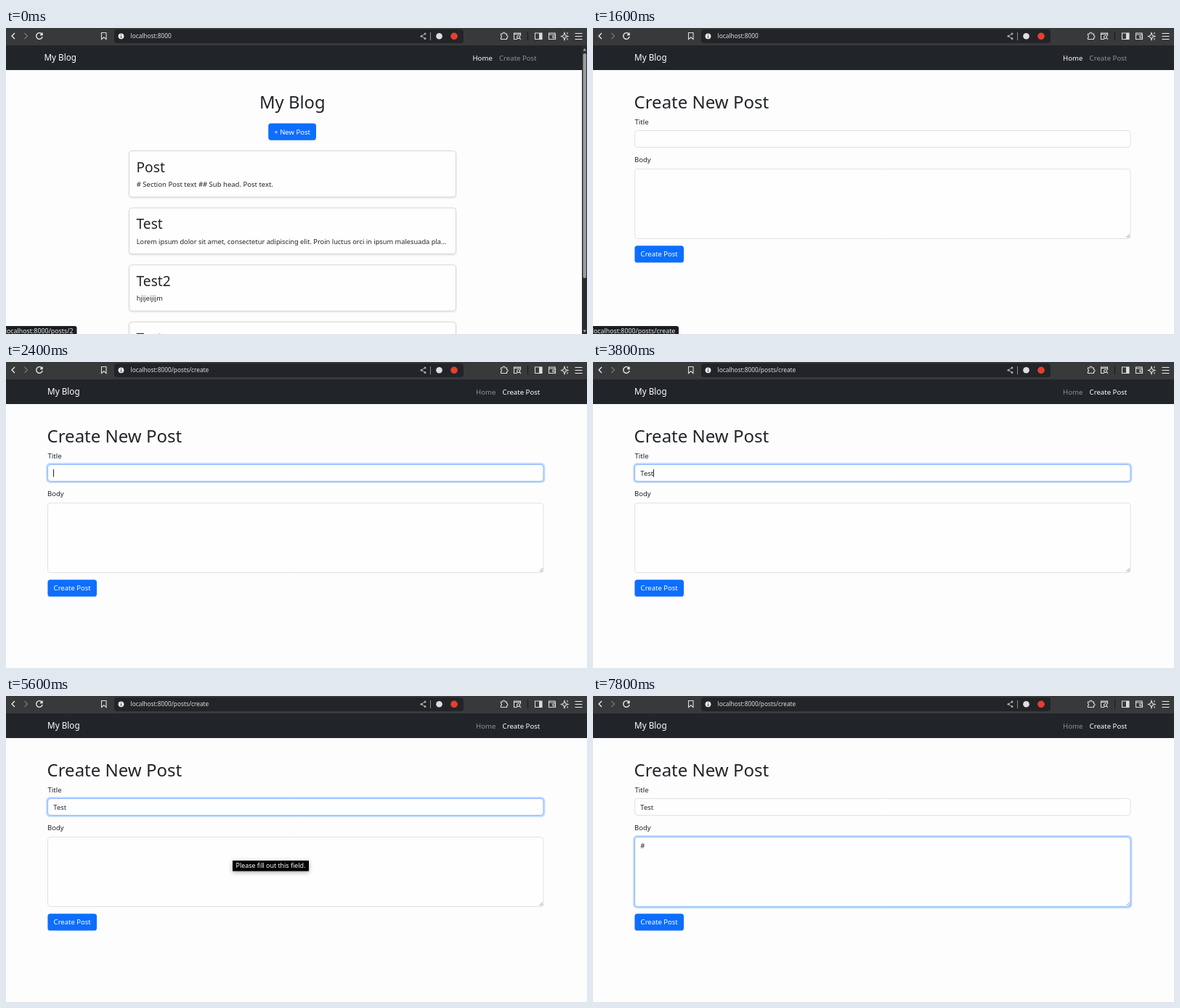
Animation, 800 px wide and 422 px high, one loop 8000 ms. Source, as an HTML page with a canvas:

```html
<!DOCTYPE html>
<html lang="en">
<head>
<meta charset="utf-8">
<title>Blog</title>
<style>
  html, body { margin: 0; width: 100%; height: 100%; overflow: hidden; background: #fefdfe; }
  canvas { display: block; }
</style>
</head>
<body>
<canvas id="stage" width="800" height="422"></canvas>
<script>
const ctx = document.getElementById('stage').getContext('2d');
const LOOP = 8000;
const INK = '#212529', BLUE = '#0d6efd', ICON = '#dcdcde';

// Latest value in a list of [start time, value] steps.
const at = (steps, t) => steps.filter(([start]) => t >= start).pop()[1];

const STATUS = [[0, '2'], [400, '3'], [600, '4'], [1000, 'create'], [2200, '']];
const TITLE = [[0, ''], [3000, 'T'], [3400, 'Te'], [3600, 'Tes'], [3800, 'Test']];
const BODY = [[0, ''], [7200, '#']];
const FOCUS = [[0, ''], [2400, 'title'], [6000, 'body']];
const CARET = [[0, false], [2400, true], [2800, false], [3000, true], [4400, false], [5000, true],
  [5600, false], [6000, true], [6400, false], [7000, true], [7800, false]];

const CARDS = [
  ['Post', '# Section Post text ## Sub head. Post text.', 9.5],
  ['Test', 'Lorem ipsum dolor sit amet, consectetur adipiscing elit. Proin luctus orci in ipsum malesuada pla…', 9.28],
  ['Test2', 'hjijeijijm', 9.2],
  ['Test', '', 9.5]
];

function text(str, x, y, size = 9.5, color = INK, align = 'left') {
  ctx.font = `${size}px "Noto Sans", "Open Sans", sans-serif`;
  ctx.textAlign = align;
  ctx.fillStyle = color;
  ctx.fillText(str, x, y);
}

function rect(x, y, w, h, fill, radius = 0, stroke) {
  ctx.beginPath();
  ctx.roundRect(x, y, w, h, radius);
  if (fill) { ctx.fillStyle = fill; ctx.fill(); }
  if (stroke) { ctx.strokeStyle = stroke; ctx.stroke(); }
}

function dot(x, y, r, fill) {
  ctx.beginPath();
  ctx.arc(x, y, r, 0, Math.PI * 2);
  ctx.fillStyle = fill;
  ctx.fill();
}

function line(path, color = ICON, width = 1.1) {
  ctx.lineWidth = width;
  ctx.strokeStyle = color;
  ctx.stroke(new Path2D(path));
  ctx.lineWidth = 1;
}

function browserBar(url) {
  rect(0, 0, 800, 24, '#38393b');
  rect(149, 2, 481, 19, '#232427', 4);
  line('M12 7L8 11L12 15', '#f0f0f0', 1.3);
  line('M25.500 7L29.500 11L25.500 15', '#77787a', 1.2);
  line('M49.500 8.500A4.300 4.300 0 1 0 50.200 12M50 6.500V9.500H47', '#f0f0f0', 1.3);
  line('M131.500 6.500H138V15.500L134.750 12.800L131.500 15.500Z');
  dot(158.500, 11.300, 3.900, '#f0f0f0');
  rect(158, 10.700, 1, 3, '#232427');
  rect(158, 8.700, 1, 1, '#232427');
  text(url, 171.500, 14.200, 8.3, '#dddddf');

  line('M577 8L572 11.200L577 14.500', '#a9aaac', 1);
  [[577, 8], [572, 11.2], [577, 14.5]].forEach(([x, y]) => dot(x, y, 1.5, '#a9aaac'));
  rect(584, 6, 1, 11, '#898a8c');
  dot(596.500, 11.300, 4.300, '#dedee2');
  dot(617, 11.300, 4.800, '#e5402f');

  line('M681.500 8H684V7.500A1.500 1.500 0 0 1 687 7.500V8H689.500V10.500A1.500 1.500 0 0 1 689.500 13.500V15.500H681.500V13A1.400 1.400 0 0 0 681.500 10.300Z');
  line('M704 15.500H699.500V7H708.500V11M699.500 8.500H708.500M707.500 14L709 15.800');
  line('M707.500 12.500A2 2 0 1 0 703.500 12.500A2 2 0 1 0 707.500 12.500');
  rect(718, 5, 1, 12, '#18191a');
  line('M728.500 7H738V15.500H728.500Z');
  rect(734, 7, 4, 8.500, ICON);
  line('M756 9V7H747.500V15.500H756.500V9H747.500M756.500 11H753V13.500H756.500');
  line('M769 6.500L770.300 10.200L774 11.500L770.300 12.800L769 16.500L767.700 12.800L764.500 11.500L767.700 10.200ZM773 6V8.500M773 14V16.500');
  line('M783.500 7.500H793.500M783.500 11.500H793.500M783.500 15.500H793.500', '#eeeeee', 1.2);
}

function navbar(dx, creating) {
  rect(0, 24, 800, 34, INK);
  text('My Blog', 52.500 + dx, 45, 11.7, '#fff');
  text('Home', 642.500 + dx, 44.500, 9.6, creating ? '#909294' : '#fff');
  text('Create Post', 679 + dx, 44.500, 9.6, creating ? '#fff' : '#909294');
}

function button(label, x, y, w, color = BLUE) {
  rect(x, y, w, 23.400, color, 3.700);
  text(label, x + w / 2, y + 15.200, 9.5, '#fff', 'center');
}

function listPage(hover) {
  text('My Blog', 394.300, 110.500, 23.8, INK, 'center');
  button('+ New Post', 361.200, 131.400, 65.800, hover ? '#0b5ed7' : BLUE);
  CARDS.forEach(([title, body, size], i) => {
    const y = 169.500 + i * 78.600;
    ctx.shadowColor = 'rgba(0,0,0,.13)';
    ctx.shadowBlur = 3;
    ctx.shadowOffsetY = 1.300;
    rect(169.500, y, 450, 63.500, '#fefefe', 3.700);
    ctx.shadowColor = 'transparent';
    rect(169.500, y, 450, 63.500, null, 3.700, '#d5d7da');
    text(title, 179.500, y + 29.300, 19.2);
    text(body, 179.700, y + 49.400, size);
  });

  rect(793, 24, 7, 398, '#2b2c2e');
  rect(794.500, 35, 4.500, 310, '#9b9c9d', 2.200);
  ctx.fillStyle = '#a5a6a7';
  ctx.fill(new Path2D('M794.500 31.500L796.800 28L799 31.500ZM794.500 416.500L796.800 420L799 416.500Z'));
}

function field(y, h, value, focused, caret) {
  if (focused) rect(55.100, y - 2.400, 687.300, h + 4.800, '#c2dbfe', 5.500);
  rect(57.500, y, 682.500, h, '#fefefe', 3.700, focused ? '#86b7fe' : '#dee2e6');
  text(value, 65.300, y + 15.500);
  if (caret) rect(Math.round(65.300 + ctx.measureText(value).width), y + 6.500, 1, 10.500, INK);
}

function formPage(t) {
  const focus = at(FOCUS, t), caret = at(CARET, t);
  text('Create New Post', 56.500, 110.500, 24);
  text('Title', 57.500, 132.500, 9.6);
  field(141.500, 23, at(TITLE, t), focus === 'title', caret && focus === 'title');
  text('Body', 57, 185.300);
  field(194.500, 96, at(BODY, t), focus === 'body', caret && focus === 'body');
  line('M734.500 289L739 284.500M737 289.500L739.300 287.200', '#77797b', 0.8);
  button('Create Post', 57.400, 300.200, 67.600);

  if (t >= 5400 && t < 6000) {
    ctx.shadowColor = 'rgba(0,0,0,.35)';
    ctx.shadowBlur = 6;
    ctx.shadowOffsetY = 1.500;
    rect(312, 227, 105, 14.500, '#000');
    ctx.shadowColor = 'transparent';
    text('Please fill out this field.', 364.500, 237.300, 8.9, '#fff', 'center');
  }
}

function statusBar(t) {
  const page = at(STATUS, t);
  if (!page) return;
  ctx.globalAlpha = t >= 2000 ? 0.5 : 1;
  rect(-4, 411, page === 'create' ? 122 : 101.500, 14, '#1d1e20', 3);
  text('localhost:8000/posts/' + page, -1.300, 420.500, 8.83, '#eeeeef');
  ctx.globalAlpha = 1;
}

function draw(now) {
  const t = now % LOOP;
  const form = t >= 1600, creating = t >= 1800;
  rect(0, 0, 800, 422, '#fefdfe');
  navbar(form ? 4.600 : 0, creating);
  browserBar('localhost:8000' + (creating ? '/posts/create' : ''));
  if (form) formPage(t);
  else listPage(t >= 1200);
  statusBar(t);
}

const start = performance.now();
function tick() {
  draw(performance.now() - start);
  requestAnimationFrame(tick);
}
tick();
</script>
</body>
</html>
```
